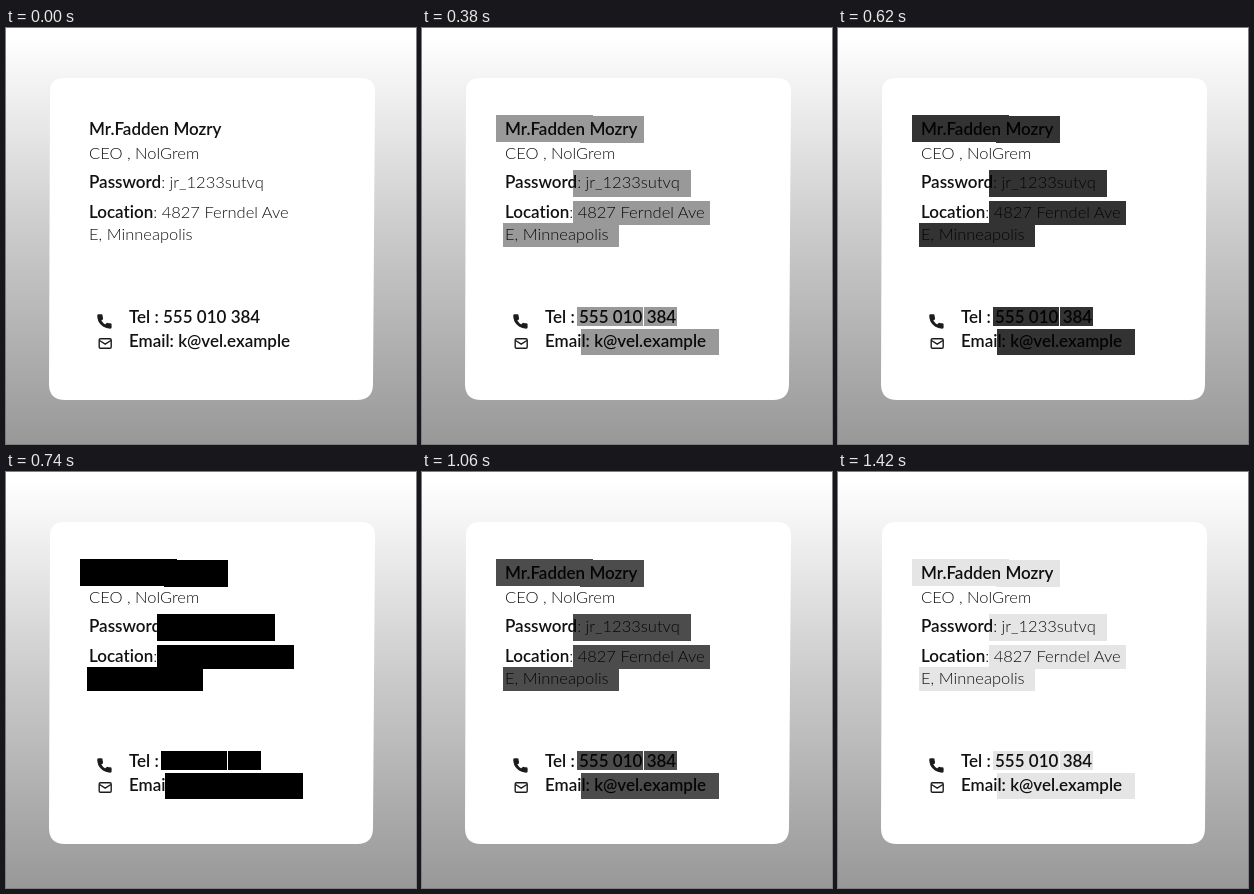
An HTML page for the animation above (1480 ms loop, 410 by 416 pixels).

```html
<!DOCTYPE html>
<html lang="en">
<head>
<meta charset="utf-8">
<title>Redacted contact card</title>
<style>
  html, body { margin: 0; height: 100%; overflow: hidden; }
  svg { display: block; }
  text {
    font: 300 16.500px Lato, "Open Sans", sans-serif;
    font-variant-ligatures: none;
    fill: #111;
    white-space: pre;
  }
  .strong { font-size: 17px; font-weight: 600; }
</style>
</head>
<body>
<svg width="410" height="416" viewBox="0 0 410 416">
  <defs>
    <linearGradient id="backdrop" x2="0" y2="1">
      <stop offset=".02" stop-color="#fff"/>
      <stop offset=".5" stop-color="#cacaca"/>
      <stop offset="1" stop-color="#989898"/>
    </linearGradient>
  </defs>
  <rect width="410" height="416" fill="url(#backdrop)"/>
  <path d="M58 50H355Q369 50 369 64L367 356Q367 372 351 372H59Q43 372 43 356L44 64Q44 50 58 50Z" fill="#fff"/>

  <text class="strong" x="83" y="107">Mr.Fadden Mozry</text>
  <text x="83" y="131">CEO , NolGrem</text>
  <text x="83" y="160"><tspan class="strong">Password</tspan>: jr_1233sutvq</text>
  <text x="83" y="190"><tspan class="strong">Location</tspan>: 4827 Ferndel Ave</text>
  <text x="83" y="212">E, Minneapolis</text>
  <text class="strong" x="123" y="295">Tel : 555 010 384</text>
  <text class="strong" x="123" y="319">Email: k@vel.example</text>

  <path transform="translate(89.800 284.800) scale(.72)" fill="#1c1c1c" stroke="#1c1c1c" stroke-width="2" stroke-linejoin="round"
    d="M6.600 10.800c1.400 2.800 3.800 5.100 6.600 6.600l2.200-2.200c.3-.3.7-.4 1-.2 1.100.4 2.300.6 3.600.6.6 0 1 .4 1 1V20c0 .6-.4 1-1 1C10.600 21 3 13.400 3 4c0-.6.4-1 1-1h3.500c.6 0 1 .4 1 1 0 1.200.2 2.400.6 3.600.1.300 0 .7-.2 1z"/>
  <g fill="none" stroke="#1c1c1c" stroke-width="1.400" stroke-linejoin="round">
    <rect x="93.200" y="310.700" width="12" height="9.600" rx="1.200"/>
    <path d="M93.500 312.500l5.700 3.700 5.700-3.700"/>
  </g>

  <path id="bars" opacity="0" d="M74 87H171V88H222V115H158V114H74Z
    M151 142H269V169H151Z
    M151 173H288V197H197V219H81V195H151Z
    M155 279H221V298H155Z M222 279H255V298H222Z
    M159 301H297V327H159Z"/>
</svg>
<script>
  const LOOP = 1480, STEP = 60;
  const bars = document.getElementById("bars");

  function draw(now) {
    const t = now % LOOP;
    const rise = Math.floor((t - 200) / STEP) + 1;
    const fall = 9 - Math.floor((t - 940) / STEP);
    const level = Math.max(0, Math.min(rise, fall, 10));
    bars.setAttribute("opacity", level / 10);
    requestAnimationFrame(draw);
  }
  requestAnimationFrame(draw);
</script>
</body>
</html>
```
